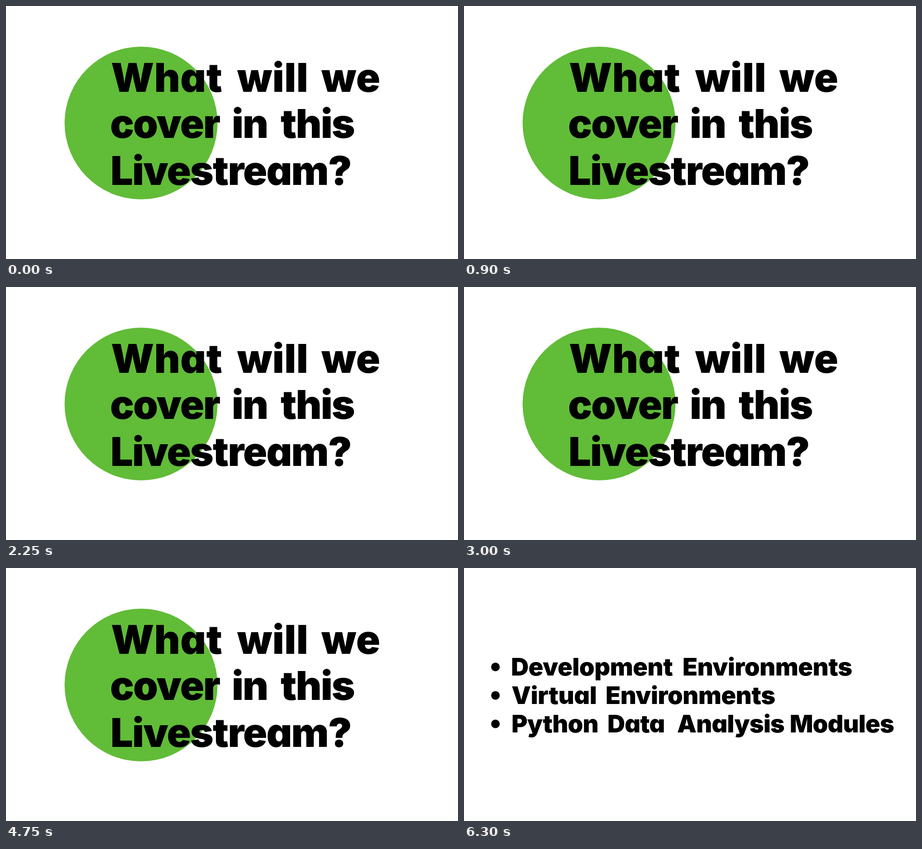
Write an HTML page that moves like this. It is 999 by 560 pixels and loops after 8000 ms.

```html
<!DOCTYPE html>
<html lang="en">
<head>
<meta charset="utf-8">
<title>Livestream agenda</title>
<style>
html, body { margin: 0; width: 100%; height: 100%; overflow: hidden; background: #fff; }
svg { display: block; width: 999px; height: 560px; }
text { font-family: Inter, Lato, sans-serif; font-weight: 900; font-feature-settings: "cv11" 1; fill: #000; }
#title text { font-size: 88px; }
#list text { font-size: 54px; }
</style>
</head>
<body>
<svg viewBox="0 0 999 560">
  <g id="title"><circle cx="298.5" cy="259" r="169" fill="#61bc38"/></g>
  <g id="list"><rect width="999" height="560" fill="#fff"/></g>
</svg>
<script>
const LOOP = 8000, FADE_START = 4750, FADE_TIME = 700;
const title = document.getElementById('title');
const list = document.getElementById('list');

function add(parent, tag, attrs, content = '') {
  const el = document.createElementNS('http://www.w3.org/2000/svg', tag);
  for (const key in attrs) el.setAttribute(key, attrs[key]);
  el.textContent = content;
  parent.append(el);
}

// Each line: baseline, letter spacing, then pairs of left edge and word
function addLine(parent, y, spacing, ...words) {
  for (const [x, word] of words) add(parent, 'text', { x, y, 'letter-spacing': spacing }, word);
}

addLine(title, 189.5, 0.5, [232, 'What'], [511, 'will'], [697, 'we']);
addLine(title, 292, -2, [230, 'cover'], [499, 'in'], [607, 'this']);
addLine(title, 395.5, -1.8, [231, 'Livestream?']);

addLine(list, 238, -0.4, [104, 'Development'], [483, 'Environments']);
addLine(list, 301, -0.4, [105, 'Virtual'], [313, 'Environments']);
addLine(list, 364, -0.8, [105, 'Python'], [317, 'Data'], [471, 'Analysis'], [720, 'Modules']);
for (const cy of [219, 282, 345]) add(list, 'circle', { cx: 69.5, cy, r: 9.5 });

function draw(now) {
  const t = now % LOOP;
  const p = Math.min(1, Math.max(0, (t - FADE_START) / FADE_TIME));
  list.setAttribute('opacity', p);
  requestAnimationFrame(draw);
}
draw(0);
</script>
</body>
</html>
```
